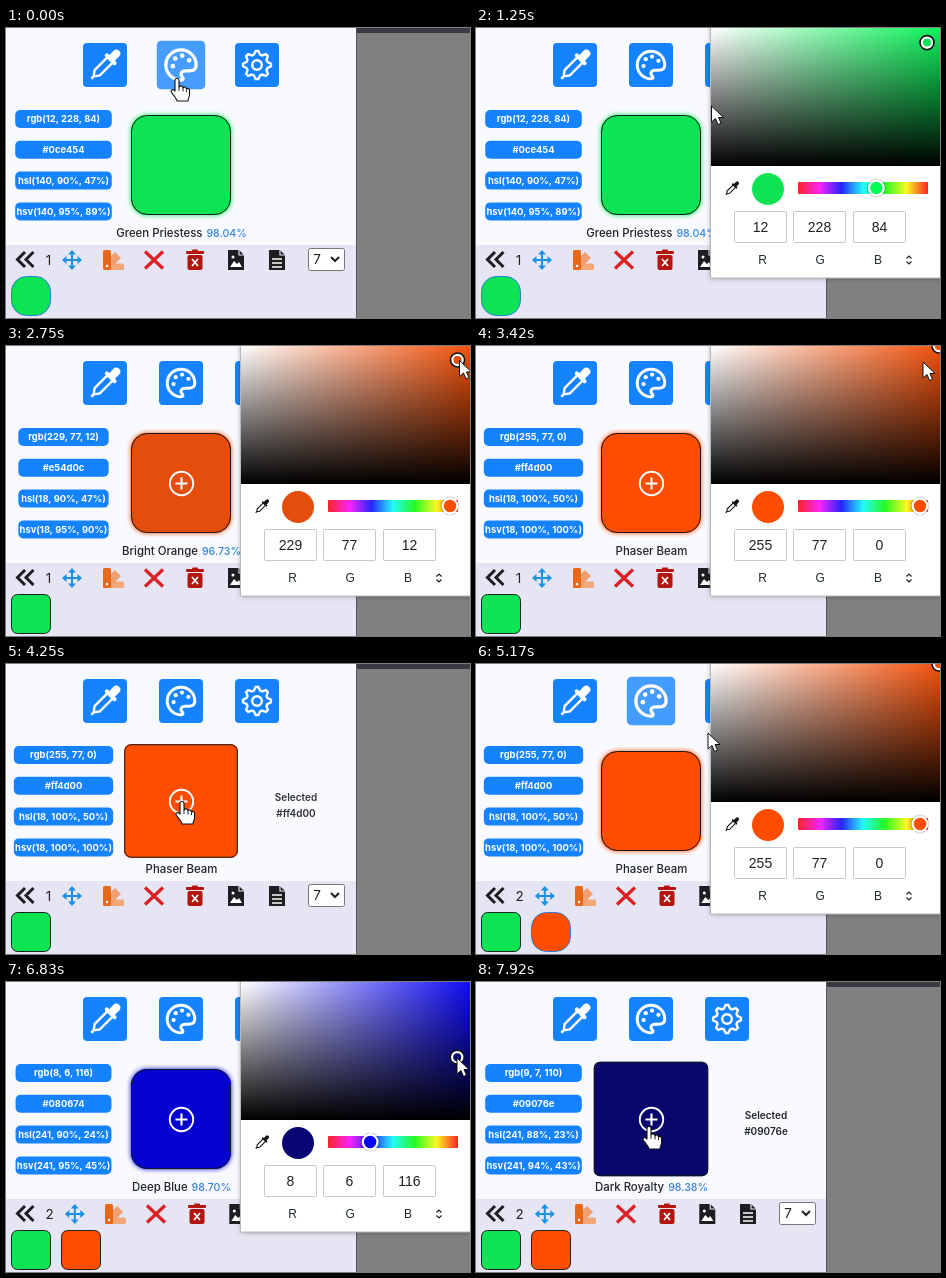
An HTML page with a canvas that plays this animation: 464x290 px, repeating every 8000 ms.

```html
<!DOCTYPE html>
<html lang="en">
<head>
<meta charset="utf-8">
<title>Colour picker</title>
<style>
html, body { margin: 0; width: 100%; height: 100%; overflow: hidden; background: #808080; }
canvas { display: block; width: 464px; height: 290px; }
</style>
</head>
<body>
<canvas id="stage"></canvas>
<script>
const W = 464, H = 290, LOOP = 8000, STEP = 1000 / 12;
const UI = 'Inter, sans-serif', SYS = '"Liberation Sans", Arial, sans-serif';
const BLUE = '#1583ff', INK = '#1c1e22';
const canvas = document.getElementById('stage');
const ctx = canvas.getContext('2d');
const dpr = window.devicePixelRatio || 1;
canvas.width = W * dpr;
canvas.height = H * dpr;

// When the user presses something
const OPEN1 = 750, HUE1 = 2200, SV1 = 2700, CLOSE1 = 4080, ADD = 4330;
const OPEN2 = 4920, HUE2 = 5650, SV2 = 6750, CLOSE2 = 7420;

const POINTER = [
  [0, 171, 51], [1000, 171, 51], [1500, 300, 105], [2050, 433, 161], [HUE1, 433, 161],
  [2420, 444, 161], [SV1, 453, 15], [3100, 464, 2], [3250, 460, 4], [3417, 447, 16],
  [4000, 176, 138], [ADD, 176, 138], [4700, 175, 50], [5000, 175, 50], [5167, 232, 69],
  [5600, 364, 160], [5720, 364, 160], [6167, 441, 69], [6600, 451, 75], [6840, 451, 76],
  [7000, 450, 78], [7100, 450, 78], [7500, 176, 142], [7917, 173, 145], [8000, 173, 145]
];
const HUE = [[0, 140], [HUE1 - 1, 140], [HUE1, 51], [2420, 18.12], [HUE2 - 1, 18.12], [HUE2, 240.94]];
const SATVAL = [
  [0, .9474, .8941], [SV1, .9474, .8941], [3100, 1, 1], [SV2 - 1, 1, 1],
  [SV2, .9483, .4549], [6840, .9483, .4549], [7000, .936, .4314]
];
const NAMES = [
  ['Green Priestess', 17, 221, 85], ['Phaser Beam', 255, 77, 0], ['Blue', 0, 0, 255],
  ['Deep Blue', 4, 2, 115], ['Dark Royalty', 2, 6, 111], ['Golden Yellow', 235, 200, 20],
  ['Tangerine', 242, 133, 0], ['Bright Orange', 235, 90, 10]
];

const clamp = x => Math.max(0, Math.min(1, x));
const ease = x => x * x * (3 - 2 * x);
const ramp = (t, start, len = 250) => ease(clamp((t - start) / len));
const pulse = (t, a, b, len) => ramp(t, a, len) - ramp(t, b, len);
const within = (t, a, b) => t >= a && t < b;

function track(rows, t) {
  let i = 0;
  while (i < rows.length - 1 && rows[i + 1][0] <= t) i++;
  const a = rows[i], b = rows[i + 1];
  if (!b) return a.slice(1);
  const k = ease((t - a[0]) / (b[0] - a[0]));
  return a.slice(1).map((v, n) => v + (b[n + 1] - v) * k);
}

function hsvToRgb(h, s, v) {
  const f = n => {
    const k = (n + h / 60) % 6;
    return Math.round(255 * (v - v * s * clamp(Math.min(k, 4 - k))));
  };
  return [f(5), f(3), f(1)];
}
const css = c => `rgb(${c.map(Math.round).join(',')})`;
const hex = c => '#' + c.map(v => v.toString(16).padStart(2, '0')).join('');
const colorAt = t => hsvToRgb(track(HUE, t)[0], ...track(SATVAL, t));

// The preview fades towards the picked colour
function fadedColor(t) {
  const sum = [0, 0, 0], n = 10;
  for (let i = 0; i < n; i++) colorAt(Math.max(0, t - i * 28)).forEach((v, k) => sum[k] += v / n);
  return sum;
}

function notations(rgb) {
  const [r, g, b] = rgb, max = Math.max(...rgb), min = Math.min(...rgb), d = max - min;
  const h = d === 0 ? 0 : max === r ? ((g - b) / d + 6) % 6 : max === g ? 2 + (b - r) / d : 4 + (r - g) / d;
  const hue = Math.round(h * 60), l = (max + min) / 510;
  const pct = x => Math.round(x * 100) + '%';
  const sat = d ? d / 255 / (1 - Math.abs(2 * l - 1)) : 0;
  return [
    `rgb(${rgb.join(', ')})`, hex(rgb),
    `hsl(${hue}, ${pct(sat)}, ${pct(l)})`,
    `hsv(${hue}, ${pct(max ? d / max : 0)}, ${pct(max / 255)})`
  ];
}

function nearest(rgb) {
  let best = ['', Infinity];
  for (const [name, ...c] of NAMES) {
    const d = Math.hypot(...c.map((v, i) => v - rgb[i]));
    if (d < best[1]) best = [name, d];
  }
  const match = 100 - best[1] / Math.hypot(255, 255, 255) * 100;
  return [best[0], best[1] < .5 ? '' : match.toFixed(2) + '%'];
}

function rect(x, y, w, h, r, fill, stroke, lw = 1) {
  ctx.beginPath();
  ctx.roundRect(x, y, w, h, r);
  if (fill) { ctx.fillStyle = fill; ctx.fill(); }
  if (stroke) { ctx.strokeStyle = stroke; ctx.lineWidth = lw; ctx.stroke(); }
}
function disc(x, y, r, fill, stroke, lw = 1) {
  ctx.beginPath();
  ctx.arc(x, y, r, 0, 7);
  if (fill) { ctx.fillStyle = fill; ctx.fill(); }
  if (stroke) { ctx.strokeStyle = stroke; ctx.lineWidth = lw; ctx.stroke(); }
}
function shape(d, fill, stroke, lw = 1) {
  const p = new Path2D(d);
  if (fill) { ctx.fillStyle = fill; ctx.fill(p); }
  if (stroke) { ctx.strokeStyle = stroke; ctx.lineWidth = lw; ctx.stroke(p); }
}
function text(s, x, y, font, color, align = 'center') {
  ctx.font = font;
  ctx.fillStyle = color;
  ctx.textAlign = align;
  ctx.textBaseline = 'alphabetic';
  ctx.fillText(s, x, y);
}
function at(x, y, scale, draw) {
  ctx.save();
  ctx.translate(x, y);
  ctx.scale(scale, scale);
  draw();
  ctx.restore();
}

function dropper(color) {
  ctx.rotate(Math.PI / 4);
  rect(-4, -20, 8, 13, 4, color);
  rect(-7.5, -10, 15, 4, 2, color);
  shape('M-3.7-7V11L0 16L3.7 11V-7', null, color, 2.4);
  disc(0, 18, 1.5, color);
}
function palette() {
  ctx.scale(1.06, 1.06);
  shape('M0 13A13 13 0 1 1 13 0C13 4 10 5 7 5H4C0 5-1 8 1 10C2.5 12 2 13 0 13Z', null, '#fff', 2.8);
  [[-7, 1], [-5, -5.5], [1, -8], [7, -4]].forEach(p => disc(...p, 2, '#fff'));
}
function gear() {
  ctx.beginPath();
  for (let i = 0; i < 32; i++) {
    const a = (i - .5) * Math.PI / 16, r = i % 4 < 2 ? 14 : 10.8;
    ctx.lineTo(r * Math.cos(a), r * Math.sin(a));
  }
  ctx.closePath();
  ctx.strokeStyle = '#fff';
  ctx.lineWidth = 2.4;
  ctx.stroke();
  disc(0, 0, 4.8, null, '#fff', 2.4);
}

function button(x, icon, hover = 0) {
  at(x, 37, 1 + .1 * hover, () => {
    ctx.globalAlpha = 1 - .22 * hover;
    rect(-22, -22, 44, 44, 4, BLUE);
    ctx.globalAlpha = 1;
    icon();
  });
}

function pills(rgb) {
  const lines = notations(rgb), font = `700 9.4px ${UI}`;
  ctx.font = font;
  const w = Math.max(...lines.map(s => ctx.measureText(s).width)) + 2.5;
  lines.forEach((s, i) => {
    const y = 82 + i * 30.8;
    rect(57.5 - w / 2, y, w, 18, 5, BLUE);
    text(s, 57.5, y + 12.2, font, '#fff');
  });
}

function preview(t, hover, plus) {
  const color = css(fadedColor(t)), half = 50 + 7.2 * hover;
  ctx.save();
  ctx.shadowColor = color;
  ctx.shadowBlur = 5 * dpr * (1 - hover);
  rect(175 - half, 137 - half, half * 2, half * 2, 16 - 10 * hover, color);
  ctx.restore();
  rect(175.5 - half, 137.5 - half, half * 2 - 1, half * 2 - 1, 16 - 10 * hover, null, '#15181c');
  if (plus > 0) {
    ctx.globalAlpha = plus;
    disc(175.5, 137.5, 11.7, null, '#fff', 1.9);
    shape('M169.5 137.5H181.5M175.5 131.5V143.5', null, '#fff', 2.1);
    ctx.globalAlpha = 1;
  }
}

function caption(rgb) {
  const nameFont = `500 11.4px ${UI}`, matchFont = `500 10.6px ${UI}`;
  const [name, match] = nearest(rgb), gap = match ? 4 : 0;
  ctx.font = nameFont;
  const nameW = ctx.measureText(name).width;
  ctx.font = matchFont;
  const x = 175.5 - (nameW + gap + ctx.measureText(match).width) / 2;
  text(name, x, 209.4, nameFont, '#202329', 'left');
  text(match, x + nameW + gap, 209.4, matchFont, '#2f83df', 'left');
}

function file(lines) {
  shape('M-8-10H3L8-5V10H-8Z', INK);
  shape('M3-10V-5H8', null, '#e5e5f3', 1.2);
  if (lines) shape('M-5-1H5M-5 3H5M-5 7H5', null, '#fff', 1.4);
  else {
    shape('M-6 7L-2 1L1 4L3 2L6 7Z', '#fff');
    disc(-3, -3, 1.5, '#fff');
  }
}

function toolbar(count) {
  const k = count - 1;
  shape('M19 224L11.5 231.5L19 239M27.5 224L20 231.5L27.5 239', null, INK, 3);
  text(count, 42.5 + k, 236.5, `400 13.5px ${UI}`, '#222');
  at(66 + 2.8 * k, 232, 1, () => {
    for (let i = 0; i < 4; i++) {
      shape('M0 0V-8', null, '#1b91e6', 2);
      shape('M0-10L4-5.5H-4Z', '#1b91e6');
      ctx.rotate(Math.PI / 2);
    }
  });
  at(107 + 2 * k, 232, 1, () => {
    rect(-4, 3.5, 15, 6.5, 1.5, '#f0a878');
    shape('M-2-4L2-8L8-2L-2 8Z', '#f0a070');
    rect(-10, -10, 8, 20, 1.5, '#e8681a');
    disc(-6, 6, 1.2, '#fff');
  });
  at(148 + 2 * k, 232, 1, () => shape('M-9-8.5L9 8.5M9-8.5L-9 8.5', null, '#dc2024', 3.2));
  at(189 + 2 * k, 232, 1, () => {
    rect(-9, -9, 18, 3, 1, '#b3150f');
    rect(-3, -10.5, 6, 3, 1, '#b3150f');
    rect(-7.5, -5, 15, 15, 2, '#b3150f');
    shape('M-3-1L3 6M3-1L-3 6', null, '#fff', 1.8);
  });
  at(230 + 1.3 * k, 232, 1, () => file(false));
  at(271 + k, 232, 1, () => file(true));
  rect(302.5 + k, 220.5, 36, 22, 2, '#fff', '#777');
  text('7', 311 + k, 236, `400 13.5px ${UI}`, '#222');
  shape(`M${325 + k} 229l4 4l4 -4`, null, '#222', 2);
}

function swatch(x, color, selected) {
  rect(x + .5, 248.5, 39, 39, 6 + 9 * selected, color, selected > .5 ? '#2b7de0' : '#222');
}

function picker(t, rgb) {
  const h = track(HUE, t)[0], [s, v] = track(SATVAL, t);
  const hueFocus = within(t, HUE1, SV1) || within(t, HUE2, SV2);
  ctx.save();
  ctx.shadowColor = 'rgba(0,0,0,.4)';
  ctx.shadowBlur = 5 * dpr;
  ctx.fillStyle = '#fff';
  ctx.fillRect(235, -10, 260, 260);
  ctx.restore();
  shape('M234.5 0V250H464', null, '#b8b8b8');

  const across = ctx.createLinearGradient(235, 0, 464, 0);
  across.addColorStop(0, '#fff');
  across.addColorStop(1, css(hsvToRgb(h, .95, .95)));
  ctx.fillStyle = across;
  ctx.fillRect(235, 0, 229, 138);
  const down = ctx.createLinearGradient(0, 0, 0, 138);
  down.addColorStop(0, 'rgba(0,0,0,0)');
  down.addColorStop(1, '#000');
  ctx.fillStyle = down;
  ctx.fillRect(235, 0, 229, 138);

  const strip = ctx.createLinearGradient(322, 0, 452, 0);
  for (let i = 0; i <= 6; i++) strip.addColorStop(i / 6, `hsl(${360 - i * 60},95%,56%)`);
  rect(322, 154, 130, 12, 1, strip);

  at(256, 160.5, .46, () => dropper('#111'));
  disc(292, 161, 16, css(rgb));

  const knob = (x, y, r, fill, focus) => {
    disc(x, y, r + 1.7, null, focus ? '#101418' : 'rgba(0,0,0,.2)', focus ? 2 : 1);
    disc(x, y, r, fill, '#fff', 2.2);
  };
  knob(321.5 + 129 * (1 - h / 360), 160, 7.3, css(hsvToRgb(h, 1, 1)), hueFocus);
  knob(235 + 228 * s, 138 * (1 - v), 5.1, css(rgb), !hueFocus);

  [258, 317, 377].forEach((x, i) => {
    rect(x + .5, 183.5, 52, 31, 1, '#fff', '#c8c8c8');
    text(rgb[i], x + 26.5, 204, `14px ${SYS}`, '#202124');
    text('RGB'[i], 286.5 + i * 57.7, 236, `12px ${SYS}`, '#202c30');
  });
  shape('M430.5 230.5l2.5 -2.5l2.5 2.5M430.5 233.5l2.5 2.5l2.5 -2.5', null, '#222', 1.2);
}

function pointer(x, y, hand) {
  ctx.lineJoin = 'round';
  at(x, y, 1, () => {
    if (hand) {
      shape('M-2 1C-2-1 2-1 2 1V8C3 6 6 7 6 9C7 7 9 8 9.5 10C11 8.5 13 10 12.5 12V16C12.5 18 11 19 11 22H0C0 20-3 17-5.5 13.5C-7 11-4.5 9.5-2 12Z', '#fff', '#111', 1.1);
      shape('M2 8V12M6 9V12.5M9.5 10.5V13', null, '#111', .9);
    } else {
      shape('M0 0V16L4 12.5L6.5 18.5L9.5 17.2L7 11.5H12Z', '#fff', '#111', 1);
    }
  });
  ctx.lineJoin = 'miter';
}

function render(t) {
  const rgb = colorAt(t), added = t >= ADD;
  const paletteHover = 1 - ramp(t, 1000) + pulse(t, 4620, 5150, 200);
  const previewHover = pulse(t, CLOSE1, 4500, 200) + ramp(t, CLOSE2, 250);
  const plus = pulse(t, HUE1, ADD, 200) + ramp(t, HUE2, 200);
  const open = within(t, OPEN1, CLOSE1) || within(t, OPEN2, CLOSE2);
  const hand = t < 1000 || within(t, CLOSE1, 4450) || within(t, 4600, 5100) || t >= CLOSE2;

  ctx.setTransform(dpr, 0, 0, dpr, 0, 0);
  rect(0, 0, W, H, 0, '#808080');
  rect(350, 0, 114, 5, 0, '#3a3a42');
  rect(0, 0, 350, 217, 0, '#f9faff');
  rect(0, 217, 350, 73, 0, '#e5e5f3');
  rect(350, 0, 1, H, 0, '#55555c');

  button(99, () => dropper('#fff'));
  button(175, palette, paletteHover);
  button(251, gear);
  pills(rgb);
  preview(t, previewHover, plus);
  caption(rgb);
  if (previewHover > .01) {
    ctx.globalAlpha = previewHover;
    text('Selected', 290, 137, `600 10px ${UI}`, '#22252b');
    text(hex(rgb), 290, 153, `600 10px ${UI}`, '#22252b');
    ctx.globalAlpha = 1;
  }
  toolbar(added ? 2 : 1);
  swatch(5, '#0ce454', 1 - ramp(t, HUE1));
  if (added) swatch(55, '#ff4d00', 1 - ramp(t, HUE2));
  if (open) picker(t, rgb);
  pointer(...track(POINTER, t), hand);
}

const start = performance.now();
function tick() {
  const ms = (performance.now() - start) % LOOP;
  render(Math.floor((ms + 4) / STEP) * STEP % LOOP);
  requestAnimationFrame(tick);
}
tick();
</script>
</body>
</html>
```
